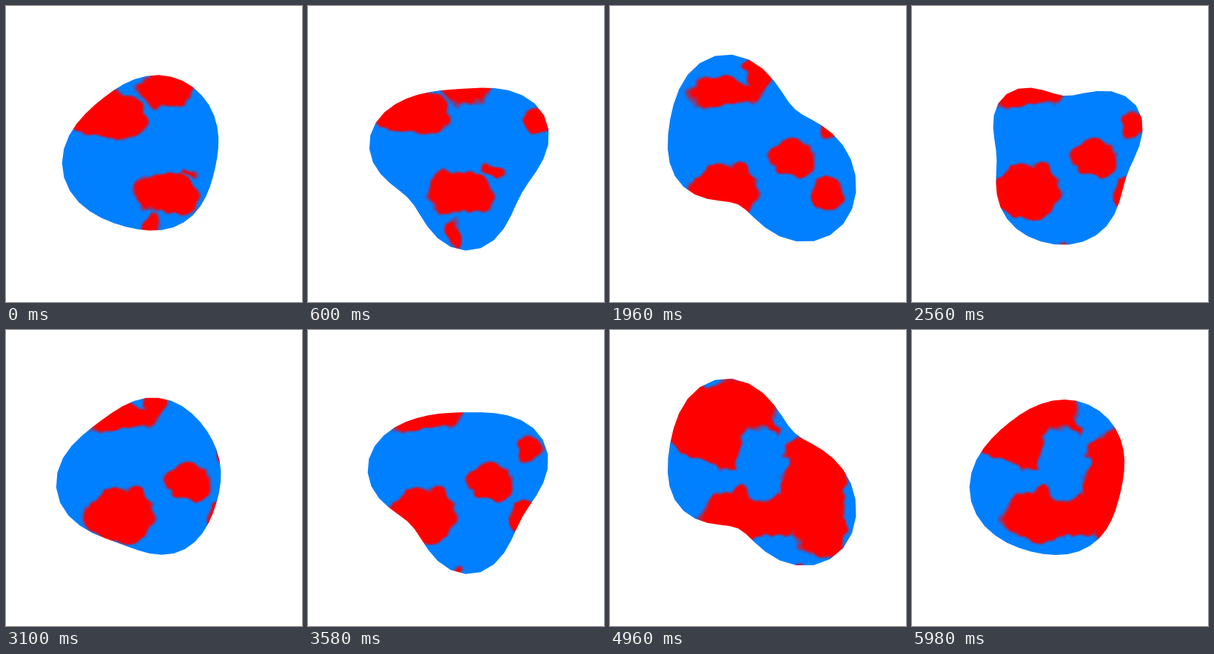
These frames come from a looping animation (400x400 px, 6 s). An HTML page with a canvas:

```html
<!DOCTYPE html>
<html lang="en">
<head>
<meta charset="utf-8">
<title>Morphing blob</title>
<style>
  html, body { margin: 0; width: 100%; height: 100%; overflow: hidden; background: #fff; }
  canvas { display: block; width: 400px; height: 400px; }
</style>
</head>
<body>
<canvas id="stage" width="400" height="400"></canvas>
<script>
const LOOP = 6000, OUTLINE_LOOP = 3000;
const SIZE = 400, CENTER = 200, GRID = 200, CELL = SIZE / GRID, VERTICES = 40;
const RED = [255, 0, 0], BLUE = [0, 128, 255];

const mix = (a, b, u) => a + (b - a) * u;
const clamp = u => Math.max(0, Math.min(1, u));
const ease = u => u * u * (3 - 2 * u);
const ramp = (time, from, to) => ease(clamp((time - from) / (to - from)));

// Weights of the lowest harmonics through an odd number of nodes; one turn is 1.
function harmonicWeights(nodes, x) {
  const chord = d => Math.sin(Math.PI * d);
  return nodes.map(node => nodes.reduce((w, other) =>
    other === node ? w : w * chord(x - other) / chord(node - other), 1));
}
const blend = (values, weights) => values.reduce((sum, v, i) => sum + v * weights[i], 0);

// Key poses of the outline: radii at equal angles, clockwise from the right.
const poses = [
  { at: 0, radii: [86, 91, 103, 108, 125, 113, 102, 107, 99] },
  { at: 600, radii: [121, 106, 132, 96, 101, 117, 94, 90, 121] },
  { at: 1440, radii: [87, 94, 71, 112, 117, 90, 106, 151, 101] },
  { at: 1960, radii: [122, 149, 107, 75, 113, 127, 146, 105, 81] },
  { at: 2560, radii: [103, 104, 123, 117, 92, 96, 103, 80, 119] }
];
const poseTimes = poses.map(pose => pose.at / OUTLINE_LOOP);
const angleNodes = poses[0].radii.map((_, i, all) => i / all.length);
const vertexWeights = Array.from({ length: VERTICES },
  (_, i) => harmonicWeights(angleNodes, (i + 0.37) / VERTICES));

function outlinePath(time) {
  const weights = harmonicWeights(poseTimes, time / OUTLINE_LOOP + 1e-6);
  const radii = angleNodes.map((_, i) => blend(poses.map(pose => pose.radii[i]), weights));
  const path = new Path2D();
  vertexWeights.forEach((w, i) => {
    const r = blend(radii, w), angle = 2 * Math.PI * (i + 0.37) / VERTICES;
    path.lineTo(CENTER + r * Math.cos(angle), CENTER + r * Math.sin(angle));
  });
  path.closePath();
  return path;
}

// Smooth value noise in -1..1 roughens the edges of the patches.
function hash(x, y) {
  const h = Math.sin(x * 127.1 + y * 311.7) * 43758.5453;
  return (h - Math.floor(h)) * 2 - 1;
}
function noise(x, y) {
  const i = Math.floor(x), j = Math.floor(y), u = ease(x - i), v = ease(y - j);
  return mix(mix(hash(i, j), hash(i + 1, j), u), mix(hash(i, j + 1), hash(i + 1, j + 1), u), v);
}
const ripple = (x, y) => 7 * noise(x / 20, y / 20) + 3 * noise(x / 9 + 40, y / 9);
const samples = Array.from({ length: GRID * GRID }, (_, i) => {
  const x = (i % GRID + 0.5) * CELL, y = (Math.floor(i / GRID) + 0.5) * CELL;
  return { x: x + ripple(x, y), y: y + ripple(x + 500, y + 300) };
});

// Each patch drifts through three ellipses: early, middle, late.
const ellipse = (x, y, rx, ry) => ({ x, y, rx, ry });
const patches = [
  [ellipse(138, 148, 51, 35), ellipse(154, 117, 48, 19), ellipse(155, 128, 72, 60)],
  [ellipse(217, 253, 44, 29), ellipse(154, 248, 45, 37), ellipse(190, 248, 66, 36)],
  [ellipse(250, 225, 9, 4), ellipse(245, 205, 31, 24), ellipse(276, 215, 46, 85)],
  [ellipse(216, 110, 40, 23), ellipse(200, 95, 16, 24), ellipse(190, 95, 30, 28)],
  [ellipse(313, 153, 19, 19), ellipse(297, 160, 16, 17), ellipse(285, 190, 20, 30)],
  [ellipse(300, 265, 4, 4), ellipse(295, 251, 21, 23), ellipse(290, 270, 30, 40)],
  [ellipse(198, 305, 13, 22), ellipse(200, 323, 9, 5), ellipse(250, 322, 9, 4)]
];
const hole = [ellipse(203, 178, 2, 2), ellipse(203, 178, 2, 2), ellipse(203, 179, 33, 51)];

function ellipseAt([early, middle, late], time) {
  const first = ramp(time, 200, 1600), second = ramp(time, 3600, 4960);
  const value = key => mix(mix(early[key], middle[key], first), late[key], second);
  return ellipse(value("x"), value("y"), value("rx"), value("ry"));
}

// Roughly the distance in pixels to the edge, positive inside.
function depth(point, e) {
  const dx = (point.x - e.x) / e.rx, dy = (point.y - e.y) / e.ry;
  return (1 - Math.sqrt(dx * dx + dy * dy)) * Math.min(e.rx, e.ry);
}

const stage = document.getElementById("stage").getContext("2d");
const textureCanvas = document.createElement("canvas");
textureCanvas.width = textureCanvas.height = GRID;
const texture = textureCanvas.getContext("2d");
const image = texture.createImageData(GRID, GRID);

function paintTexture(time) {
  const reds = patches.map(patch => ellipseAt(patch, time));
  const blue = ellipseAt(hole, time);
  samples.forEach((point, i) => {
    let level = -SIZE;
    for (const red of reds) level = Math.max(level, depth(point, red));
    level = Math.min(level, -depth(point, blue));
    const redness = clamp(0.5 + level / 4);
    for (let c = 0; c < 3; c++) image.data[i * 4 + c] = mix(BLUE[c], RED[c], redness);
    image.data[i * 4 + 3] = 255;
  });
  texture.putImageData(image, 0, 0);
}

function render(time) {
  paintTexture(time);
  stage.fillStyle = "#fff";
  stage.fillRect(0, 0, SIZE, SIZE);
  stage.save();
  stage.clip(outlinePath(time));
  stage.drawImage(textureCanvas, 0, 0, SIZE, SIZE);
  stage.restore();
}

const start = performance.now();
function tick() {
  render((performance.now() - start) % LOOP);
  requestAnimationFrame(tick);
}
tick();
</script>
</body>
</html>
```
